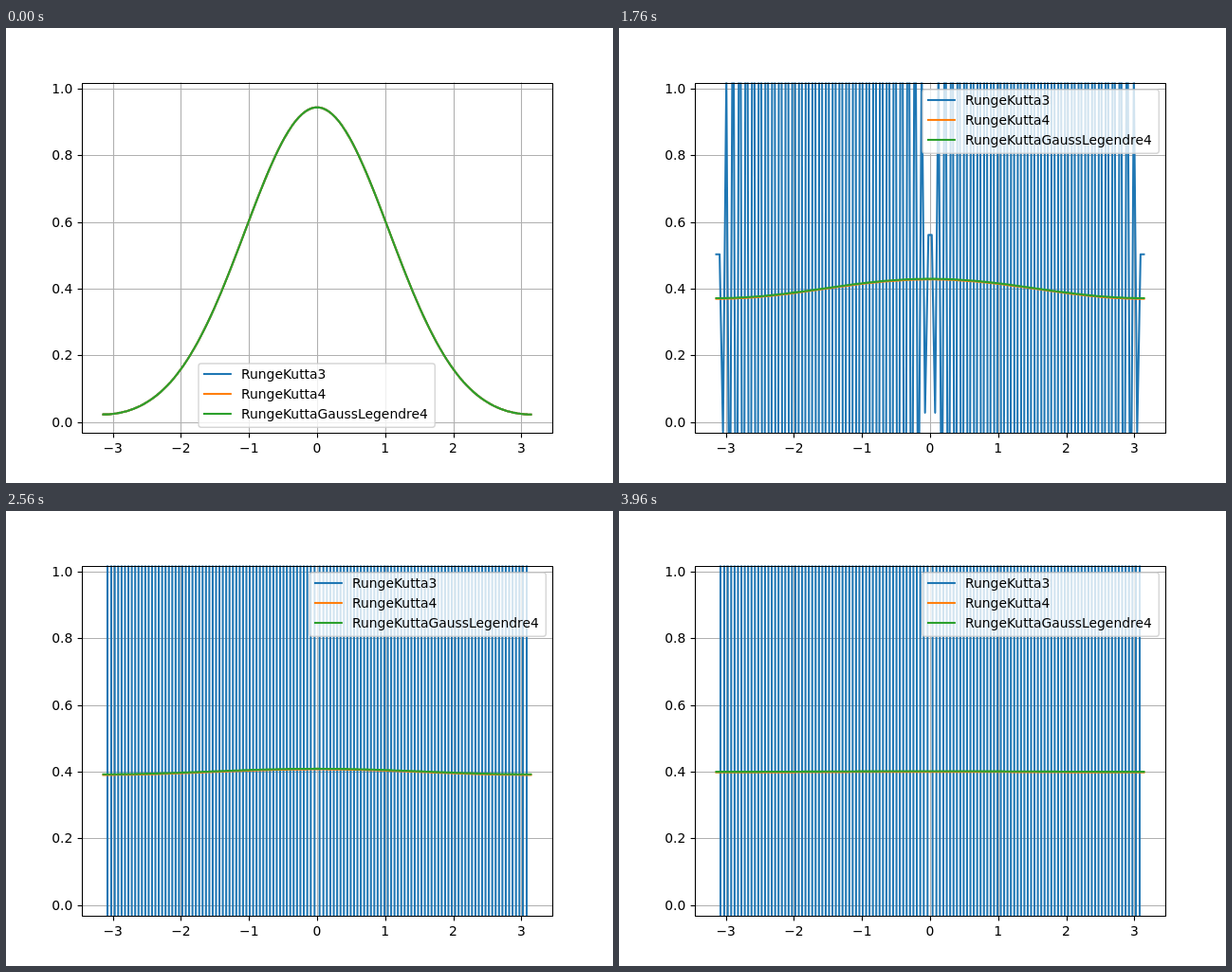
Animation, 640 px wide and 480 px high, one loop 3.98 s. Source, as an HTML page with a canvas:

```html
<!DOCTYPE html>
<html lang="en">
<head>
<meta charset="utf-8">
<title>Heat equation: integrator comparison</title>
<style>
  html, body { margin: 0; width: 100%; height: 100%; overflow: hidden; background: #fff; }
  canvas { display: block; }
</style>
</head>
<body>
<canvas id="plot" width="640" height="480"></canvas>
<script>
const ctx = document.getElementById('plot').getContext('2d');
const STEP = 20, STEPS = 199, POINTS = 128;
const BOX = { left: 80, right: 576, top: 57.6, bottom: 427.2 };
const LINE = 2.083, THIN = 1.11;
const SERIES = [
  ['RungeKutta3', '#1f77b4'],
  ['RungeKutta4', '#ff7f0e'],
  ['RungeKuttaGaussLegendre4', '#2ca02c']
];
const X_TICKS = [-3, -2, -1, 0, 1, 2, 3];
const Y_TICKS = [0, 0.2, 0.4, 0.6, 0.8, 1];

const px = x => 328 + x * 496 / (2.2 * Math.PI);
const py = y => 415.85 - 351.95 * y;
const snap = v => Math.floor(v + 0.5) + 0.5;

function stroke(points, color, width, cap = 'butt') {
  ctx.beginPath();
  for (const [x, y] of points) ctx.lineTo(x, y);
  ctx.strokeStyle = color;
  ctx.lineWidth = width;
  ctx.lineCap = cap;
  ctx.lineJoin = 'round';
  ctx.stroke();
}

function label(text, x, y, align) {
  ctx.fillStyle = '#000';
  ctx.textAlign = align;
  ctx.fillText(text, x, y);
}

// Diffusing bell curve on a periodic domain, as a cosine series
function heat(x, step) {
  const variance = 1.123 + 0.0626 * step;
  let u = 0.3989;
  for (let n = 1; n < 7; n++) u += 0.7979 * Math.exp(-n * n * variance / 2) * Math.cos(n * x);
  return u;
}

// Fastest growing unstable grid mode, with zero slope at both ends
function ripple(j, step) {
  const k = Math.min(Math.max(j, 1), POINTS - 2);
  const amp = Math.min(0.47 * Math.exp(0.187 * (step - 75)), 2000);
  return -amp * (k % 2 ? -1 : 1) * Math.sin(2 * Math.PI * (k - 0.5) / (POINTS - 2));
}

function curve(color, value) {
  const points = [];
  for (let j = 0; j < POINTS; j++) {
    const x = -Math.PI + 2 * Math.PI * j / (POINTS - 1);
    points.push([px(x), py(value(x, j))]);
  }
  stroke(points, color, LINE, 'square');
}

function drawGrid() {
  for (const x of X_TICKS) {
    const gx = snap(px(x));
    stroke([[gx, BOX.top], [gx, BOX.bottom]], '#b0b0b0', THIN);
  }
  for (const y of Y_TICKS) {
    const gy = snap(py(y));
    stroke([[BOX.left, gy], [BOX.right, gy]], '#b0b0b0', THIN);
  }
}

function drawAxes() {
  for (const x of X_TICKS) {
    const gx = snap(px(x));
    stroke([[gx, 427.5], [gx, 432.4]], '#000', THIN);
    label(String(x).replace('-', '\u2212'), px(x), 448, 'center');
  }
  for (const y of Y_TICKS) {
    const gy = snap(py(y));
    stroke([[75.6, gy], [80.5, gy]], '#000', THIN);
    label(y.toFixed(1), 70.3, Math.round(py(y)) + 5, 'right');
  }
  ctx.strokeStyle = '#000';
  ctx.lineWidth = THIN;
  ctx.strokeRect(80.5, 58.5, 496, 369);
}

function drawLegend(step) {
  const low = step < 7;   // the peak still reaches the upper corner
  ctx.save();
  if (low) ctx.translate(-117, 289);
  ctx.beginPath();
  ctx.roundRect(320, 65, 249.3, 67.3, 2.8);
  ctx.fillStyle = 'rgba(255,255,255,0.8)';
  ctx.fill();
  ctx.strokeStyle = 'rgba(204,204,204,0.8)';
  ctx.lineWidth = 1.39;
  ctx.stroke();
  SERIES.forEach(([name, color], k) => {
    const y = 76 + 21 * k;
    stroke([[326, y], [353.8, y]], color, LINE, 'square');
    label(name, 365, y + 5, 'left');
  });
  ctx.restore();
}

function draw(step) {
  ctx.fillStyle = '#fff';
  ctx.fillRect(0, 0, 640, 480);
  ctx.font = '13.89px "DejaVu Sans", sans-serif';
  drawGrid();

  ctx.save();
  ctx.beginPath();
  ctx.rect(BOX.left, BOX.top, BOX.right - BOX.left, BOX.bottom - BOX.top);
  ctx.clip();
  const drift = 0.0018 * (1 - Math.exp(-step / 15));
  curve(SERIES[0][1], (x, j) => heat(x, step) + ripple(j, step));
  curve(SERIES[1][1], x => heat(x, step));
  curve(SERIES[2][1], x => heat(x, step) + drift);
  ctx.restore();

  drawAxes();
  drawLegend(step);
}

const start = performance.now();
function tick() {
  draw(Math.floor((performance.now() - start) / STEP) % STEPS);
  requestAnimationFrame(tick);
}
tick();
</script>
</body>
</html>
```
